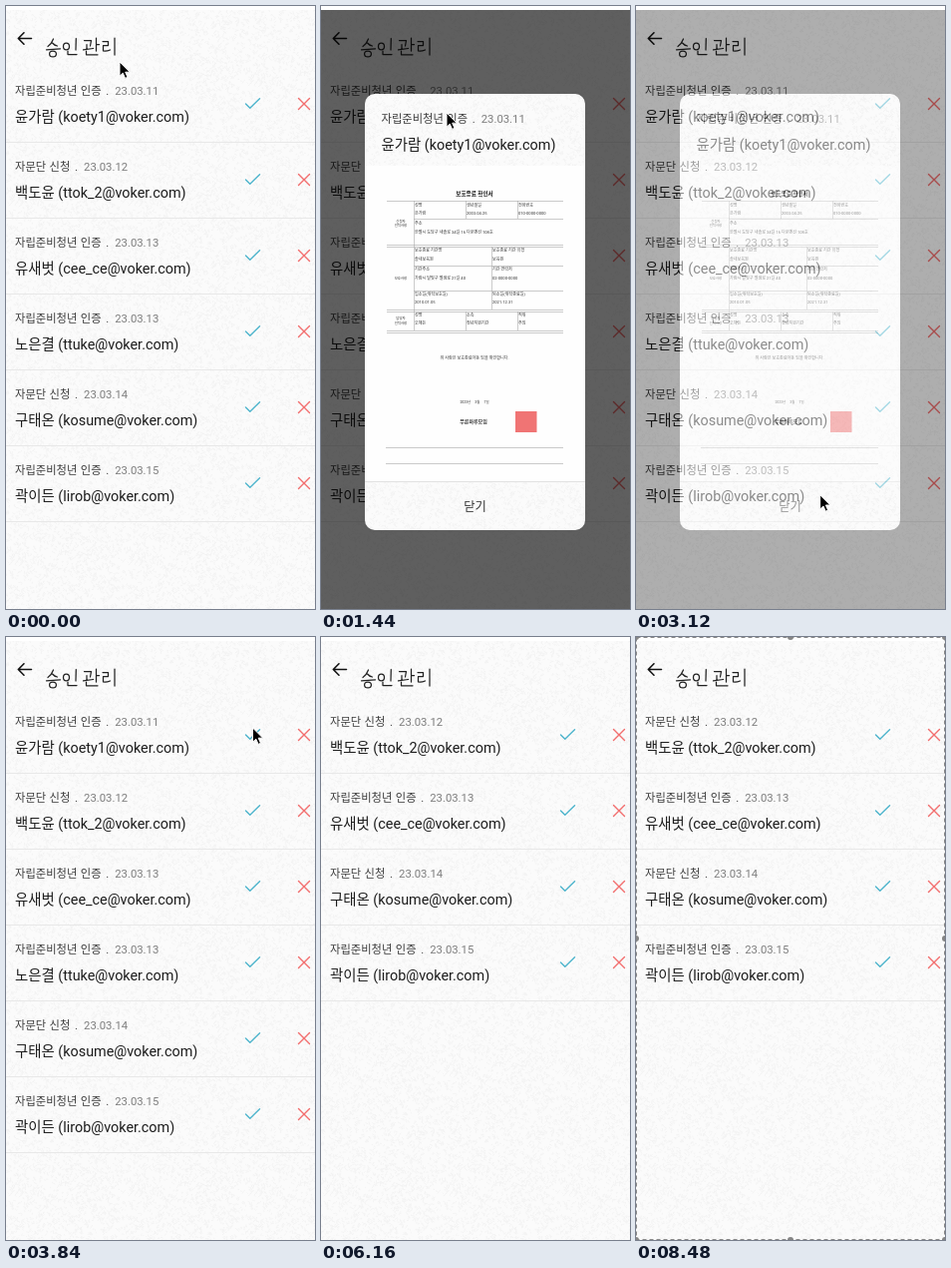
An HTML page for the animation above (8560 ms loop, 310 px wide and 604 px high).

```html
<!DOCTYPE html>
<html lang="ko">
<head>
<meta charset="utf-8">
<title>승인 관리</title>
<style>
  html, body { margin: 0; width: 100%; height: 100%; overflow: hidden; background: #fff; }
  svg { display: block; width: 310px; height: 604px; }
  text { font-family: Roboto, "Noto Sans CJK KR", "Noto Sans CJK", sans-serif; white-space: pre; }
  .tag { font-size: 11.3px; fill: #3c3c3c; word-spacing: .6px; }
  .tag .date { fill: #7d7d7d; }
  .name { font-size: 14.4px; fill: #1c1c1c; }
  .doc text { font-size: 4.1px; fill: #333; }
  .doc .mid { text-anchor: middle; }
  .doc .label { font-size: 3.4px; text-anchor: middle; }
  .line { fill: none; stroke-linecap: round; stroke-linejoin: round; }
</style>
</head>
<body>
<svg id="stage" viewBox="0 0 310 604">
  <defs>
    <pattern id="paper" width="120" height="120" patternUnits="userSpaceOnUse">
      <rect width="120" height="120" fill="#fbfbfb"/>
      <path id="grain" fill="none" stroke="#f3f3f3" stroke-width=".9"/>
    </pattern>
    <clipPath id="card"><rect x="44" y="88" width="221" height="437" rx="10"/></clipPath>
  </defs>

  <rect width="310" height="604" fill="#fff"/>
  <rect y="4" width="310" height="600" fill="url(#paper)"/>

  <path class="line" d="M25.5 32.5H12.3M18 26.8L12.3 32.5L18 38.2" stroke="#111" stroke-width="1.6"/>
  <g class="line" stroke="#222" stroke-width="1.25" role="img" aria-label="승인 관리">
    <path d="M47.5 33Q46 37.5 42 40.5M46.5 37Q48.5 39.5 51.5 40M40.5 43.8L54.5 42.8"/>
    <ellipse cx="47" cy="48" rx="3.4" ry="2.9"/>
    <ellipse cx="60.5" cy="40.5" rx="3" ry="3.3"/>
    <path d="M70.3 32.5L70 44M62 45V48.5H71"/>
    <path d="M78.5 34.5H85.5L84.5 40M81 38.5V43M77.5 43.8L87.5 42.5M90.5 32V45M90.5 38.5H93.5M80.5 45V48.8H92"/>
    <path d="M97 35.5H102.5V39.5H97.5V45Q101 45.5 104.5 44M109 32V49"/>
  </g>

  <g id="list"></g>

  <g id="modal">
    <rect y="4" width="310" height="600" fill="#000" fill-opacity=".62"/>
    <g clip-path="url(#card)">
      <rect x="44" y="88" width="221" height="437" fill="url(#paper)"/>
      <rect x="44" y="160" width="221" height="316" fill="#fefefe"/>
      <path d="M44 476.5H265" stroke="#e2e2e2"/>
    </g>
    <g id="head"></g>
    <g id="doc" class="doc">
      <path id="rules" fill="none" stroke="#a8a8a8" stroke-width=".6"/>
      <rect x="195" y="406" width="21.5" height="21" fill="#f07474"/>
    </g>
    <text x="154.5" y="505.5" font-size="12.3" text-anchor="middle" fill="#333">닫기</text>
  </g>

  <g id="frame" fill="#858585">
    <rect x=".5" y=".5" width="309" height="603" fill="none" stroke="#8a8a8a" stroke-dasharray="4 3"/>
  </g>

  <path id="cursor" d="M0 0V14.2L3.3 11.2L5.6 16.4L8 15.3L5.7 10.2H10.2Z"
        fill="#000" stroke="#fff" stroke-width="1" stroke-linejoin="round"/>
</svg>

<script>
const LOOP = 8560;
const OPEN = 1200, CLOSE = 3040, FADE = 160, SELECT = 7520;
const YOUTH = "자립준비청년 인증", ADVISOR = "자문단 신청";

// kind, date, name, account, time of leaving the list
const people = [
  [YOUTH, "23.03.11", "윤가람", "koety1", 4160],
  [ADVISOR, "23.03.12", "백도윤", "ttok_2"],
  [YOUTH, "23.03.13", "유새벗", "cee_ce"],
  [YOUTH, "23.03.13", "노은결", "ttuke", 5680],
  [ADVISOR, "23.03.14", "구태온", "kosume"],
  [YOUTH, "23.03.15", "곽이든", "lirob"],
];

// time, x, y of the pointer tip
const track = [
  [0, 114, 56], [240, 114, 56], [960, 126, 107], [1760, 126, 107],
  [2720, 183.5, 478], [2880, 184, 494], [3080, 184, 494],
  [3760, 247.5, 91], [4400, 247.5, 91], [4960, 247.5, 231.5],
  [5360, 298, 245], [5760, 298, 245], [6000, 322, 262], [LOOP, 322, 262],
];

const $ = id => document.getElementById(id);

function add(parent, tag, attrs, content) {
  const el = document.createElementNS("http://www.w3.org/2000/svg", tag);
  for (const key in attrs) el.setAttribute(key, attrs[key]);
  if (content) el.textContent = content;
  return parent.appendChild(el);
}

function heading(parent, x, y, [kind, date, name, account]) {
  const tag = add(parent, "text", { class: "tag", x, y });
  add(tag, "tspan", {}, kind);
  add(tag, "tspan", { dx: 4.7 }, ".");
  add(tag, "tspan", { dx: 6, class: "date" }, date);
  add(parent, "text", { class: "name", x, y: y + 26.5 }, `${name} (${account}@voker.com)`);
}

function makeRow(person) {
  const row = add($("list"), "g");
  heading(row, 9, 89, person);
  const icon = (d, stroke) => add(row, "path", { class: "line", d, stroke, "stroke-width": 1.4 });
  icon("M240.5 98L244.8 102.2L254.5 92.8", "#4db4cc");
  icon("M293.5 92.5L304.5 103.5M304.5 92.5L293.5 103.5", "#f26d6d");
  add(row, "path", { d: "M0 136.5H310", stroke: "#e8e8e8" });
  return { row, leaves: person[4] ?? Infinity };
}

function makeGrain() {
  let seed = 7;
  const rnd = n => (seed = seed * 16807 % 2147483647) / 2147483647 * n;
  let d = "";
  for (let i = 0; i < 1400; i++) {
    const bend = () => (rnd(6) - 3).toFixed(1);
    d += `M${rnd(120).toFixed(1)} ${rnd(120).toFixed(1)}q${bend()} ${bend()} ${bend()} ${bend()}`;
  }
  $("grain").setAttribute("d", d);
}

function makeDoc() {
  const doc = $("doc");
  const put = (x, y, s, cls = "") => add(doc, "text", { x, y, class: cls }, s);
  const cells = (y, xs, words) => words.forEach((w, i) => put(xs[i], y, w));
  const three = [94, 146, 198], two = [94, 172];

  let d = "";
  for (const y of [195.5, 239.5, 241.5, 304.5, 306.5, 325.5, 327.5]) d += `M66 ${y}H243`;
  for (const y of [213.5, 260.5, 285.5]) d += `M93 ${y}H243`;
  for (const y of [442.5, 458.5]) d += `M65 ${y}H243`;
  d += "M93.5 195V325M145.5 195V213M197.5 195V213M171.5 241V304M145.5 306V325M197.5 306V325";
  $("rules").setAttribute("d", d);

  add(doc, "text", { x: 154, y: 189.5, class: "mid", style: "font-size:5.6px;font-weight:700;fill:#111" }, "보호종료 확인서");
  cells(200.5, three, ["성명", "생년월일", "전화번호"]);
  cells(209, three, ["윤가람", "2003.04.25", "010-0000-0000"]);
  put(94, 218.5, "주소");
  put(94, 227.5, "한별시 도담구 새솔로 34길 16 다온맨션 108호");
  put(80, 216.5, "신청자", "label");
  put(80, 221, "인적사항", "label");

  cells(245.5, two, ["보호종료 기관명", "보호종료 기관 유형"]);
  cells(255, two, ["솔내보육원", "보육원"]);
  cells(265, two, ["기관주소", "기관 연락처"]);
  cells(273.5, two, ["가람시 달빛구 별샘로 21길 40", "02-0000-0000"]);
  cells(290, two, ["입소일(위탁보호일)", "퇴소일(위탁종료일)"]);
  cells(298, two, ["2010.01.05", "2021.12.31"]);
  put(80, 273.5, "보호사항", "label");

  cells(310.5, three, ["성명", "소속", "직위"]);
  cells(318.5, three, ["오해든", "청년지원기관", "주임"]);
  put(80, 314, "담당자", "label");
  put(80, 318.5, "인적사항", "label");

  put(154, 353.5, "위 사람은 보호종료아동 임을 확인합니다.", "mid");
  put(154, 398, "2023년     3월     7일", "label");
  add(doc, "text", { x: 153, y: 417.5, class: "mid", style: "font-size:5px;font-weight:700" }, "푸른마루모임");
}

function makeHandles() {
  for (const x of [0, 155, 310]) for (const y of [0, 302, 604])
    if (x !== 155 || y !== 302) add($("frame"), "circle", { cx: x, cy: y, r: 3 });
}

makeGrain();
makeDoc();
makeHandles();
heading($("head"), 60.5, 117, people[0]);
const rows = people.map(makeRow);

const clamp = v => Math.max(0, Math.min(1, v));
const show = (el, on) => el.setAttribute("visibility", on ? "visible" : "hidden");

function pointerAt(t) {
  const i = track.findIndex(([end]) => end > t);
  const [t0, x0, y0] = track[i - 1], [t1, x1, y1] = track[i];
  const p = (t - t0) / (t1 - t0), k = p * p * (3 - 2 * p);
  return [x0 + (x1 - x0) * k, y0 + (y1 - y0) * k];
}

function draw(time) {
  const t = Math.max(0, time) % LOOP;
  let slot = 0;
  for (const { row, leaves } of rows) {
    const on = t < leaves;
    show(row, on);
    if (on) row.setAttribute("transform", `translate(0 ${76 * slot++})`);
  }
  const alpha = clamp((t - OPEN) / FADE) * clamp((CLOSE + FADE - t) / FADE);
  $("modal").setAttribute("opacity", alpha);
  show($("modal"), alpha > 0);
  show($("frame"), t >= SELECT);
  $("cursor").setAttribute("transform", `translate(${pointerAt(t)})`);
}

const start = performance.now();
function tick() {
  draw(performance.now() - start);
  requestAnimationFrame(tick);
}
tick();
</script>
</body>
</html>
```
